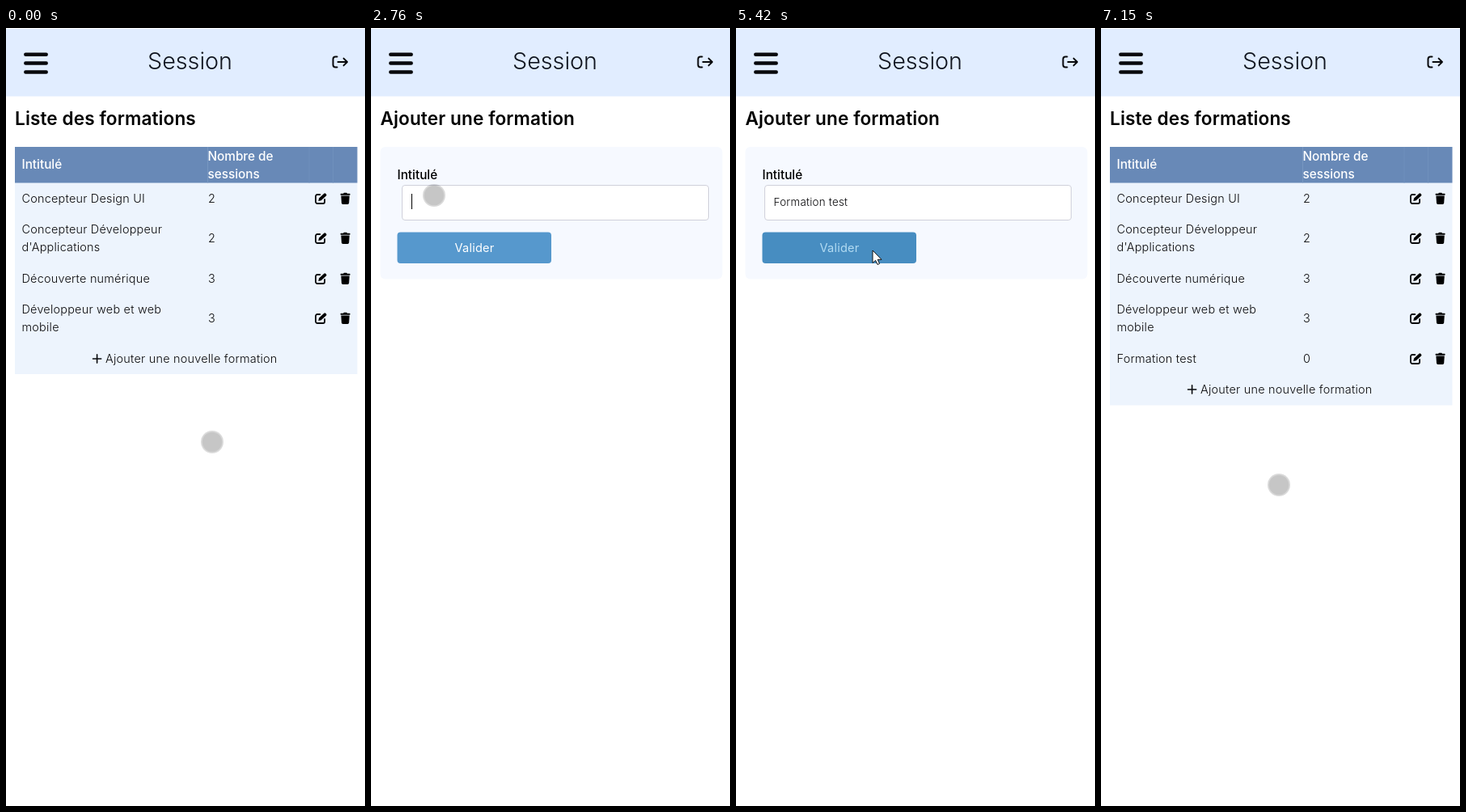
Write an HTML page that moves like this. It is 444 by 962 pixels and loops after 7.76 s.

```html
<!DOCTYPE html>
<html lang="fr">
<head>
<meta charset="utf-8">
<title>Liste des formations</title>
<style>
  :root { --loop: 7760ms; }
  html, body { margin: 0; width: 100%; height: 100%; overflow: hidden; background: #fff; }
  body { position: relative; font-family: Inter, "Open Sans", sans-serif; font-optical-sizing: none; }
  svg, .form { position: absolute; left: 0; top: 0; width: 444px; height: 962px; }
  text { font-size: 14.4px; font-weight: 350; letter-spacing: .24px; fill: #0b0b0d; }
  .brand { font-size: 28.7px; font-weight: 350; fill: #10151f; letter-spacing: 0; }
  .title { font-size: 22.6px; font-weight: 600; letter-spacing: .1px; fill: #000; }
  .label { font-size: 15.3px; font-weight: 500; letter-spacing: 0; fill: #000; }
  .head .label { fill: #fff; }
  .line { fill: none; stroke: #08090c; stroke-linecap: round; stroke-linejoin: round; }

  .list, .form, .extra, .dot, .arrow { animation: var(--loop) step-end infinite; }
  .list { animation-name: list; }
  .form { animation-name: form; }
  .extra { animation-name: extra; }
  .add { animation: add var(--loop) step-end infinite; }
  @keyframes list { 0% { opacity: 1 } 15.335% { opacity: 0 } 72.165%, 100% { opacity: 1 } }
  @keyframes form { 0% { opacity: 0 } 15.335% { opacity: 1 } 72.165%, 100% { opacity: 0 } }
  @keyframes extra { 0% { opacity: 0 } 72.165%, 100% { opacity: 1 } }
  @keyframes add { 0% { transform: none } 72.165%, 100% { transform: translateY(38px) } }

  .field {
    position: absolute; left: 32.5px; top: 194px; width: 380.5px; height: 43.5px;
    box-sizing: border-box; padding-left: 11px; border: 1px solid #cfd0da; border-radius: 4px;
    background: #fff; color: #0b0b0d; font-size: 13.35px; font-weight: 350; line-height: 41px; white-space: pre;
    animation: slide var(--loop) ease infinite;
  }
  @keyframes slide {
    0%, 28.995% { transform: none }
    32.861%, 68.557% { transform: translateX(5px) }
    72.423%, 100% { transform: none }
  }
  .field i {
    font-style: normal; letter-spacing: .018em;
    animation: type var(--loop) calc(var(--i) * 85ms) step-end infinite backwards;
  }
  @keyframes type { 0% { font-size: 0 } 36.147%, 100% { font-size: 13.35px } }
  .caret {
    display: inline-block; position: relative; top: -1.5px; width: 1.6px; height: 19px;
    vertical-align: middle; background: #000; animation: blink var(--loop) step-end infinite;
  }
  @keyframes blink {
    0% { opacity: 0 } 28.995% { opacity: 1 } 57.216% { opacity: 0 }
    64.046% { opacity: 1 } 68.17%, 100% { opacity: 0 }
  }

  .button { fill: #5698cd; animation: hover var(--loop) infinite; }
  .caption { fill: #fff; font-size: 14.6px; font-weight: 400; animation: tint var(--loop) infinite; }
  @keyframes hover { 0%, 68.17% { fill: #5698cd } 69.845%, 100% { fill: #478dc1 } }
  @keyframes tint { 0%, 68.17% { fill: #fff } 69.845%, 100% { fill: #b2dbf2 } }

  .dot { animation-name: dot; }
  .arrow { animation-name: arrow; }
  @keyframes dot { 0% { opacity: 1 } 68.17% { opacity: 0 } 72.165%, 100% { opacity: 1 } }
  @keyframes arrow { 0% { opacity: 0 } 68.17% { opacity: 1 } 72.165%, 100% { opacity: 0 } }
  .path { animation: path var(--loop) linear infinite; }
  @keyframes path {
    0% { transform: translate(255px, 512px) }
    10.954% { transform: translate(228px, 397px); animation-timing-function: ease-out }
    12.887%, 15.464% { transform: translate(222px, 404px); animation-timing-function: ease-in-out }
    21.907% { transform: translate(75px, 189px); animation-timing-function: ease-out }
    25.129%, 51.16% { transform: translate(78px, 207px); animation-timing-function: ease-in-out }
    60.954% { transform: translate(166px, 275px); animation-timing-function: ease-out }
    62.113%, 72.165% { transform: translate(169px, 276px); animation-timing-function: ease-in }
    77.706% { transform: translate(162px, 340px) }
    83.119% { transform: translate(172px, 395px) }
    87.887% { transform: translate(198px, 465px); animation-timing-function: ease-out }
    92.139%, 100% { transform: translate(220px, 565px) }
  }
</style>
</head>
<body>
<svg viewBox="0 0 444 962">
  <defs>
    <g id="tools">
      <g transform="translate(389.3 0)">
        <path class="line" stroke-width="1.8" d="M-1-5H-4.3a2 2 0 0 0-2 2V4a2 2 0 0 0 2 2H2.8a2 2 0 0 0 2-2V1"/>
        <path d="M-3 3l.8-3.4L4-6.3a1.4 1.4 0 0 1 2 0l.7.7a1.4 1.4 0 0 1 0 2L.4 2.3z"/>
      </g>
      <g transform="translate(419.6 0)">
        <rect x="-6" y="-6.2" width="12" height="2" rx=".7"/>
        <rect x="-2.2" y="-7.2" width="4.4" height="2" rx=".7"/>
        <path d="M-5.2-3.4H5.2L4.6 5.6A1.6 1.6 0 0 1 3 7H-3A1.6 1.6 0 0 1-4.6 5.6z"/>
      </g>
    </g>
  </defs>

  <rect y="1" width="444" height="83.5" fill="#e1edff"/>
  <path class="line" stroke-width="4.5" d="M24.3 32.7H49.7M24.3 43.5H49.7M24.3 54.4H49.7"/>
  <text class="brand" x="227.5" y="51" text-anchor="middle">Session</text>
  <path class="line" stroke-width="2" d="M409.5 35.5H407.5a3 3 0 0 0-3 3v7a3 3 0 0 0 3 3H409.5M410.5 42H422M417.6 37.6L422 42l-4.4 4.4"/>

  <g class="list">
    <text class="title" x="11" y="120">Liste des formations</text>
    <rect x="11" y="147" width="423.5" height="281" fill="#edf4fd"/>
    <g class="head">
      <rect x="11" y="147" width="423.5" height="44.5" fill="#6889b7"/>
      <path d="M249.5 147V191.5" stroke="#7c9ac5" stroke-width=".8"/>
      <path d="M375 147V191.5M404.5 147V191.5" stroke="#7192be" stroke-width=".8"/>
      <text class="label" x="19.5" y="174">Intitulé</text>
      <text class="label" x="249.5" y="163.5">Nombre de</text>
      <text class="label" x="249.5" y="186">sessions</text>
    </g>
    <g id="rows"></g>
    <g class="extra" id="extra">
      <rect x="11" y="427.5" width="423.5" height="39" fill="#edf4fd"/>
    </g>
    <g class="add">
      <path class="line" stroke-width="1.6" d="M107.5 409H117.7M112.6 403.9V414.1"/>
      <text x="123" y="414">Ajouter une nouvelle formation</text>
    </g>
  </g>
</svg>

<div class="form">
  <svg viewBox="0 0 444 962">
    <text class="title" x="11.5" y="120">Ajouter une formation</text>
    <rect x="11.5" y="147" width="423" height="163.5" rx="6" fill="#f6f9ff"/>
    <text class="label" x="32.5" y="187">Intitulé</text>
    <rect class="button" x="32.5" y="252.5" width="190.5" height="38.5" rx="4"/>
    <text class="caption" x="128" y="277" text-anchor="middle">Valider</text>
  </svg>
  <div class="field"><span id="typed"></span><span class="caret"></span></div>
</div>

<svg viewBox="0 0 444 962">
  <g class="path">
    <g class="dot">
      <circle r="14" fill-opacity=".15"/>
      <circle r="12.3" fill-opacity=".09"/>
    </g>
    <path class="arrow" d="M0-1V14.5L3.6 11.3 6 16.5 8.5 15.4 6.2 10.3H11z" fill="#fff" stroke="#111" stroke-width="1"/>
  </g>
</svg>

<script>
  const newName = "Formation test";
  const byId = id => document.getElementById(id);

  // A row is centred on y; its title may hold one or two lines.
  function row(y, count, ...lines) {
    const top = y + 5 - (lines.length - 1) * 11;
    const title = lines.map((line, i) => `<text x="19.5" y="${top + i * 22}">${line}</text>`).join("");
    return `${title}<text x="250" y="${y + 5}">${count}</text><use href="#tools" y="${y}"/>`;
  }

  byId("rows").innerHTML =
    row(211, 2, "Concepteur Design UI") +
    row(260, 2, "Concepteur Développeur", "d'Applications") +
    row(310, 3, "Découverte numérique") +
    row(359, 3, "Développeur web et web", "mobile");
  byId("extra").innerHTML += row(409, 0, newName);
  byId("typed").innerHTML = [...newName].map((c, i) => `<i style="--i:${i}">${c}</i>`).join("");
</script>
</body>
</html>
```
